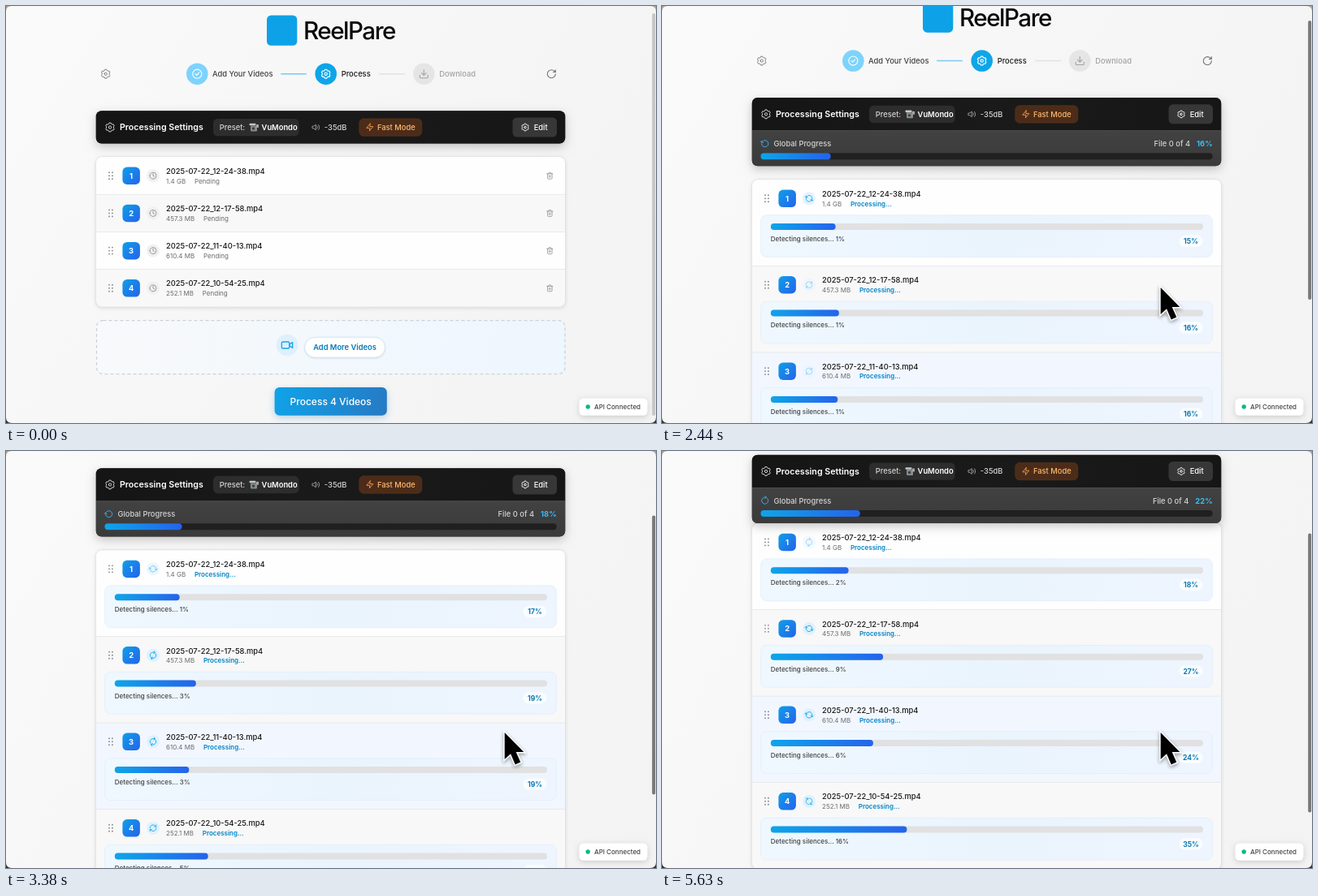
Animation, 800 px wide and 514 px high, one loop 5.69 s. Source, as an HTML page with a canvas:

```html
<!DOCTYPE html>
<html lang="en">
<head>
<meta charset="utf-8">
<title>Video queue</title>
<style>
html, body { margin: 0; width: 100%; height: 100%; overflow: hidden; background: #f7f7f7; }
canvas { display: block; width: 100vw; height: 100vh; }
</style>
</head>
<body>
<canvas id="stage"></canvas>
<script>
const W = 800, H = 514, LOOP = 5690;
const canvas = document.getElementById('stage');
const ctx = canvas.getContext('2d');
const FONT = 'Inter, "Open Sans", sans-serif';
const SKY = '#0ea5e9', BLUE = '#2563eb', LINK = '#0284c7';

const ICONS = {
  redo: 'M21 12a9 9 0 1 1-9-9c2.52 0 4.93 1 6.74 2.74L21 8M21 3v5h-5',
  sync: 'M3 12a9 9 0 0 1 9-9 9.75 9.75 0 0 1 6.74 2.74L21 8M21 3v5h-5M21 12a9 9 0 0 1-9 9 9.75 9.75 0 0 1-6.74-2.74L3 16M8 16H3v5',
  check: 'M2 12a10 10 0 1 1 20 0a10 10 0 1 1-20 0M8 12l3 3 5-6',
  clock: 'M2 12a10 10 0 1 1 20 0a10 10 0 1 1-20 0M12 6v6l4 2',
  download: 'M21 15v4a2 2 0 0 1-2 2H5a2 2 0 0 1-2-2v-4M7 10l5 5 5-5M12 15V3',
  trash: 'M3 6h18M19 6v14c0 1-1 2-2 2H7c-1 0-2-1-2-2V6M8 6V4c0-1 1-2 2-2h4c1 0 2 1 2 2v2M10 11v6M14 11v6',
  zap: 'M13 2 3 14h9l-1 8 10-12h-9l1-8z',
  volume: 'M11 5 6 9H2v6h4l5 4zM15.5 8.5a5 5 0 0 1 0 7M19 5a10 10 0 0 1 0 14',
  video: 'M4 6h10a2 2 0 0 1 2 2v8a2 2 0 0 1-2 2H4a2 2 0 0 1-2-2V8a2 2 0 0 1 2-2M16 13l6 4V7l-6 4',
  gear: gearPath()
};
for (const k in ICONS) ICONS[k] = new Path2D(ICONS[k]);

function gearPath() {
  let d = '';
  for (let i = 0; i < 6; i++) {
    const a = i * Math.PI / 3 - Math.PI / 2;
    for (const [da, r] of [[-.34, 8.2], [-.2, 10], [.2, 10], [.34, 8.2]]) {
      d += (d ? 'L' : 'M') + (12 + r * Math.cos(a + da)) + ' ' + (12 + r * Math.sin(a + da));
    }
  }
  return d + 'ZM9 12a3 3 0 1 1 6 0a3 3 0 1 1-6 0';
}

// Progress keys: [bar fill %, step %, label %] at each of TIMES
const TIMES = [1450, 1900, 2440, 2750, 3380, 4500, 5630];
const GLOBAL = [[0, 0, 15], [14.8, 0, 15], [15.5, 0, 16], [16.2, 0, 16], [17.1, 0, 18], [19.9, 0, 20], [22, 0, 22]];
const ROWS = [
  { name: '2025-07-22_12-24-38.mp4', size: '1.4 GB', start: 750,
    keys: [[0, 0, 15], [15, 1, 15], [15, 1, 15], [15, 1, 15], [15, 1, 17], [17.4, 2, 18], [18, 2, 18]] },
  { name: '2025-07-22_12-17-58.mp4', size: '457.3 MB', start: 1460,
    keys: [[0, 0, 15], [15, 0, 15], [15.8, 1, 16], [17.3, 2, 18], [18.8, 3, 19], [22.8, 6, 23], [26, 9, 27]] },
  { name: '2025-07-22_11-40-13.mp4', size: '610.4 MB', start: 1460,
    keys: [[0, 0, 15], [15, 0, 15], [15.5, 1, 16], [16, 1, 16], [17.2, 3, 19], [20.6, 5, 21], [23.7, 6, 24]] },
  { name: '2025-07-22_10-54-25.mp4', size: '252.1 MB', start: 1380,
    keys: [[0, 0, 15], [15, 1, 16], [17.5, 2, 18], [19, 3, 19], [21.6, 5, 22], [25.9, 8, 26], [31.5, 16, 35]] }
];
const SCROLL = [[2290, 0], [2440, 16], [2750, 59], [3050, 92], [3380, 108], [3850, 122], [4400, 140.5], [4800, 140.5], [4900, 141]];

const clamp = v => Math.max(0, Math.min(1, v));
const ease = v => { v = clamp(v); return v * v * (3 - 2 * v); };
const ramp = (t, from, dur) => ease((t - from) / dur);

function track(t, times, values) {
  if (t <= times[0]) return values[0];
  for (let i = 1; i < times.length; i++) {
    if (t <= times[i]) {
      const u = (t - times[i - 1]) / (times[i] - times[i - 1]);
      return values[i - 1] + (values[i] - values[i - 1]) * u;
    }
  }
  return values[values.length - 1];
}
const keyed = (t, keys, col) => track(t, TIMES, keys.map(k => k[col]));
const whole = v => Math.floor(v + .001);

function grad(x0, y0, x1, y1, ...stops) {
  const g = ctx.createLinearGradient(x0, y0, x1, y1);
  stops.forEach((c, i) => g.addColorStop(i / (stops.length - 1), c));
  return g;
}
function box(x, y, w, h, r, fill, stroke, lw = .7) {
  ctx.beginPath();
  ctx.roundRect(x, y, w, h, r);
  if (fill) { ctx.fillStyle = fill; ctx.fill(); }
  if (stroke) { ctx.strokeStyle = stroke; ctx.lineWidth = lw; ctx.stroke(); }
}
function shadowed(color, blur, dy, draw) {
  const k = ctx.getTransform().a;
  ctx.save();
  ctx.shadowColor = color;
  ctx.shadowBlur = blur * k;
  ctx.shadowOffsetY = dy * k;
  draw();
  ctx.restore();
}
function disc(x, y, r, fill) {
  ctx.beginPath();
  ctx.arc(x, y, r, 0, 7);
  ctx.fillStyle = fill;
  ctx.fill();
}
// Text is centred vertically on its cap height; returns its width.
function text(s, x, cy, size, weight, color, align = 'left', spacing = 0) {
  ctx.font = `${weight} ${size}px ${FONT}`;
  ctx.letterSpacing = spacing + 'px';
  ctx.textAlign = align;
  ctx.fillStyle = color;
  ctx.fillText(s, x, cy + size * .363);
  return ctx.measureText(s).width;
}
function icon(name, x, y, size, color, angle = 0, lw = 2) {
  ctx.save();
  ctx.translate(x, y);
  ctx.rotate(angle);
  ctx.scale(size / 24, size / 24);
  ctx.translate(-12, -12);
  ctx.strokeStyle = color;
  ctx.lineWidth = lw;
  ctx.lineCap = ctx.lineJoin = 'round';
  ctx.stroke(ICONS[name]);
  ctx.restore();
}
const spin = (t, start) => (t - start) / 1000 * Math.PI * 2;

function bar(x, y, w, h, pct, back) {
  box(x, y, w, h, h / 2, back);
  const fw = w * pct / 100;
  if (fw > .5) box(x, y, fw, h, Math.min(h, fw) / 2, grad(x, 0, x + fw, 0, SKY, BLUE));
}

function drawHeader() {
  box(321, 11.5, 37.3, 37.3, 5.3, '#0da2e7');
  text('ReelPare', 366, 30.5, 29.6, 500, '#0a0a0a', 'left', -1.5);

  const y = 83.7;
  icon('gear', 122.7, y, 13.3, '#7d7d7d', 0, 1.8);
  icon('redo', 671.3, y, 13.3, '#737373');
  disc(235.3, y, 13.3, '#7dd3fc');
  icon('check', 235.3, y, 13.3, '#fff');
  text('Add Your Videos', 254, y, 9.33, 500, '#404040');
  box(338, y - .7, 32, 1.4, .7, '#7cc8f2');
  disc(393.7, y, 13.3, SKY);
  icon('gear', 393.7, y, 13.3, '#fff');
  text('Process', 412.7, y, 9.33, 500, '#171717');
  box(459, y - .7, 32, 1.4, .7, '#e2e2e2');
  disc(514.3, y, 13.3, '#e5e5e5');
  icon('download', 514.3, y, 13.3, '#a3a3a3');
  text('Download', 533.3, y, 9.33, 500, '#a3a3a3');
}

function drawSettings(t, top, open) {
  const x = 110.7, w = 577.6, h = 40.3 + 44 * open, cy = top + 20.3;
  shadowed('rgba(0,0,0,.22)', 12, 4, () => box(x, top, w, h, 7, '#1c1c1c'));
  ctx.save();
  box(x, top, w, h, 7);
  ctx.clip();
  ctx.fillStyle = grad(x, 0, x + w, 0, '#151515', '#1a1a1a', '#161616');
  ctx.fillRect(x, top, w, 40.5);

  icon('gear', 128, cy, 13.3, '#d4d4d4', 0, 1.8);
  text('Processing Settings', 140, cy, 10.67, 600, '#fff');
  box(255, top + 9.7, 105.6, 21.3, 5.3, '#2d2d2d');
  text('Preset:', 262.8, cy, 9.33, 500, '#d4d4d4');
  box(299.5, cy - 4.8, 8, 2.6, 1, '#c4c8c9');
  box(301, cy - 2, 8, 7, 1, '#858b8e');
  disc(304.5, cy + 1.5, 1.7, '#3d4143');
  box(308, cy - 3.6, 3, 4, .6, '#a2a7a9');
  text('VuMondo', 314.6, cy, 9.33, 600, '#fff');
  icon('volume', 381.4, cy, 10.7, '#a3a3a3');
  text('-35dB', 391.8, cy, 9.33, 500, '#d4d4d4');
  box(434.8, top + 9.7, 77, 21.3, 5.3, '#4c2c18', '#59341c');
  icon('zap', 447.8, cy, 10.7, '#f59a4e');
  text('Fast Mode', 457, cy, 9.33, 500, '#fdba74');
  box(623.5, top + 8.3, 54.5, 24, 5.3, '#373737');
  icon('gear', 639, cy, 10.7, '#fff');
  text('Edit', 649.7, cy, 9.33, 500, '#fff');

  if (open > 0) {
    ctx.globalAlpha = open;
    ctx.fillStyle = grad(0, top + 40, 0, top + 84, '#424242', '#3a3a3a');
    ctx.fillRect(x, top + 40.5, w, 44);
    ctx.fillStyle = '#585858';
    ctx.fillRect(x, top + 40.3, w, .7);
    const py = top + 56.5;
    icon('redo', 126.7, py, 10.7, '#38aef0', spin(t, 750));
    text('Global Progress', 137.5, py, 9.33, 500, '#d4d4d4');
    const pct = t < TIMES[0] ? 0 : whole(keyed(t, GLOBAL, 2));
    const pw = text(pct + '%', 677.6, py, 9.33, 700, '#38bdf8', 'right');
    text('File 0 of 4', 669.6 - pw, py, 9.33, 500, '#d4d4d4', 'right');
    bar(121.4, top + 68.2, 556.3, 8, keyed(t, GLOBAL, 0), '#202020');
  }
  ctx.restore();
}

function drawRow(t, row, i, y, h, grown, hover) {
  const x = 111, w = 577, cy = y + 23.2, busy = t >= row.start;
  ctx.fillStyle = i % 2 ? '#f8f8f8' : '#fefefe';
  ctx.fillRect(x, y, w, h);
  if (hover) {
    ctx.fillStyle = `rgba(239,246,255,${.8 * hover})`;
    ctx.fillRect(x, y, w, h);
  }
  if (i) {
    ctx.fillStyle = '#e3e3e3';
    ctx.fillRect(x, y - .35, w, .7);
  }
  for (let n = 0; n < 6; n++) disc(127 + (n % 2) * 3.9, cy + (Math.floor(n / 2) - 1) * 4, .95, '#8c8c8c');
  box(143.4, cy - 10.7, 21.5, 21.5, 5.6, grad(143, cy - 10, 165, cy + 10, '#0f9fe8', BLUE));
  text(String(i + 1), 154.1, cy, 9.33, 700, '#fff', 'center');

  if (busy) {
    ctx.globalAlpha = .7 + .3 * Math.cos((t - row.start) / 1000 * Math.PI);
    disc(181, cy, 8, '#dff1fe');
    icon('sync', 181, cy, 10, SKY, spin(t, row.start));
    ctx.globalAlpha = 1;
  } else {
    disc(181, cy, 8, '#f0f0f0');
    icon('clock', 181, cy, 9.6, '#858585');
    icon('trash', 669.3, cy, 9.6, '#949494');
  }
  text(row.name, 197, y + 17.5, 9.33, 500, '#171717');
  const sw = text(row.size, 197, y + 29.6, 8, 400, '#6b6b6b');
  if (busy) text('Processing...', 207.7 + sw, y + 29.6, 8, 600, LINK);
  else text('Pending', 207.7 + sw, y + 29.6, 8, 400, '#6b6b6b');

  if (grown > 0) {
    ctx.save();
    ctx.beginPath();
    ctx.rect(x, y, w, h);
    ctx.clip();
    ctx.globalAlpha = grown;
    box(121.7, y + 43.7, 555.6, 51.8, 7, grad(122, 0, 677, 0, '#eff8ff', '#eaf4fd', '#eef5fe'), '#deedf9');
    bar(133.8, y + 54, 532.2, 8, keyed(t, row.keys, 0), '#e1e1e1');
    text(`Detecting silences... ${whole(keyed(t, row.keys, 1))}%`, 133.8, y + 73, 8, 500, '#404040');
    box(636.5, y + 68.6, 29, 14.4, 7.2, '#fafdff');
    text(whole(keyed(t, row.keys, 2)) + '%', 651, y + 76, 8.6, 700, '#0678b4', 'center');
    ctx.restore();
  }
}

function drawList(t, top, grown) {
  const rowH = 46.2 + 60.25 * grown, h = rowH * 4;
  shadowed('rgba(0,0,0,.1)', 4, 1, () => box(111, top, 577, h, 7, '#fff', '#e2e2e2', 1.2));
  ctx.save();
  box(111, top, 577, h, 7);
  ctx.clip();
  ROWS.forEach((row, i) => drawRow(t, row, i, top + i * rowH, rowH, grown, i === 2 ? ramp(t, 1330, 100) : 0));
  ctx.restore();
  return top + h;
}

function drawDropZone(y, hover) {
  box(111.5, y, 576.5, 66, 8, grad(111, y, 688, y + 66, '#f8f9fa', '#f2f8fd', '#eef6fe'));
  ctx.globalAlpha = hover;
  box(111.5, y, 576.5, 66, 8, '#ecf6fe');
  ctx.globalAlpha = 1;
  ctx.setLineDash([4, 3]);
  box(111.5, y, 576.5, 66, 8, null, '#c9d2d9', 1.2);
  ctx.setLineDash([]);
  disc(346, y + 30.4, 13.3, '#def0fc');
  icon('video', 346, y + 30.4, 16, '#1ba3e6');
  shadowed('rgba(0,0,0,.08)', 2, 1, () => box(367.6, y + 20.6, 99, 25, 12.5, '#fff', '#bfe3f8'));
  text('Add More Videos', 417, y + 33, 9.33, 600, '#0579b8', 'center');
}

function drawButton(y) {
  shadowed('rgba(14,120,190,.28)', 8, 3, () =>
    box(330.6, y, 138.2, 34.6, 6, grad(331, y, 469, y + 34, '#0fa3e8', '#2779c4')));
  text('Process 4 Videos', 399.7, y + 17.3, 12, 500, '#fff', 'center');
}

function drawStatus() {
  shadowed('rgba(0,0,0,.16)', 7, 2, () => box(705.5, 483.5, 84, 21.3, 5.3, '#fff'));
  disc(716.2, 494, 2.7, '#10b981');
  text('API Connected', 724, 494, 8, 500, '#404040');
}

function drawScrollbar(t, scroll) {
  const early = 1 - ramp(t, 60, 350);
  const late = ramp(t, 2200, 120);
  ctx.globalAlpha = early || late;
  if (early) box(795.2, 9, 4, 496, 2, '#c6c6c6');
  else if (late) box(795.2, 7.3 + scroll * .668, 4, 344, 2, '#787878');
  ctx.globalAlpha = 1;
}

function drawCursor(t) {
  const enter = ramp(t, 80, 380), move = ramp(t, 1080, 290);
  if (!enter) return;
  const x = 430 - 30 * enter + 213 * move;
  const y = 520 - 39 * enter - 135 * move;
  ctx.save();
  ctx.translate(x + .7, y + 1);
  ctx.beginPath();
  [[0, 0], [0, 33], [7.4, 26.2], [13, 39.4], [19.6, 36.6], [14, 24], [23.6, 24]].forEach(p => ctx.lineTo(...p));
  ctx.closePath();
  ctx.lineJoin = 'miter';
  ctx.strokeStyle = '#fff';
  ctx.lineWidth = 3;
  shadowed('rgba(0,0,0,.4)', 4, 2, () => ctx.stroke());
  ctx.fillStyle = '#000';
  ctx.fill();
  ctx.restore();
}

function drawCorners() {
  const r = 7;
  for (const [x, y, sx, sy, c] of [[0, 0, 1, 1, '#aba48c'], [W, 0, -1, 1, '#aba48c'], [0, H, 1, -1, '#303030'], [W, H, -1, -1, '#303030']]) {
    ctx.beginPath();
    ctx.moveTo(x, y);
    ctx.lineTo(x + sx * r, y);
    ctx.quadraticCurveTo(x, y, x, y + sy * r);
    ctx.fillStyle = c;
    ctx.fill();
  }
}

function draw(t) {
  const scroll = track(t, SCROLL.map(p => p[0]), SCROLL.map(p => p[1]));
  const open = ramp(t, 750, 200);
  const grown = ramp(t, 1450, 200);

  ctx.fillStyle = grad(0, 0, W, H, '#fafafa', '#f6f6f6', '#f3f3f3');
  ctx.fillRect(0, 0, W, H);
  ctx.save();
  ctx.translate(0, -scroll);
  drawHeader();
  const end = drawList(t, 186 + 44.2 * open, grown);
  drawDropZone(end + 16.8, open * (1 - ramp(t, 1130, 100)));
  drawButton(end + 99.3);
  ctx.restore();
  drawSettings(t, Math.max(4.7, 129.2 - scroll), open);
  drawStatus();
  drawScrollbar(t, scroll);
  drawCursor(t);
  drawCorners();
}

function resize() {
  const dpr = window.devicePixelRatio || 1;
  canvas.width = Math.round(innerWidth * dpr);
  canvas.height = Math.round(innerHeight * dpr);
  ctx.setTransform(canvas.width / W, 0, 0, canvas.height / H, 0, 0);
}
addEventListener('resize', resize);
resize();

const began = performance.now();
function frame() {
  draw((performance.now() - began) % LOOP);
  requestAnimationFrame(frame);
}
frame();
</script>
</body>
</html>
```
